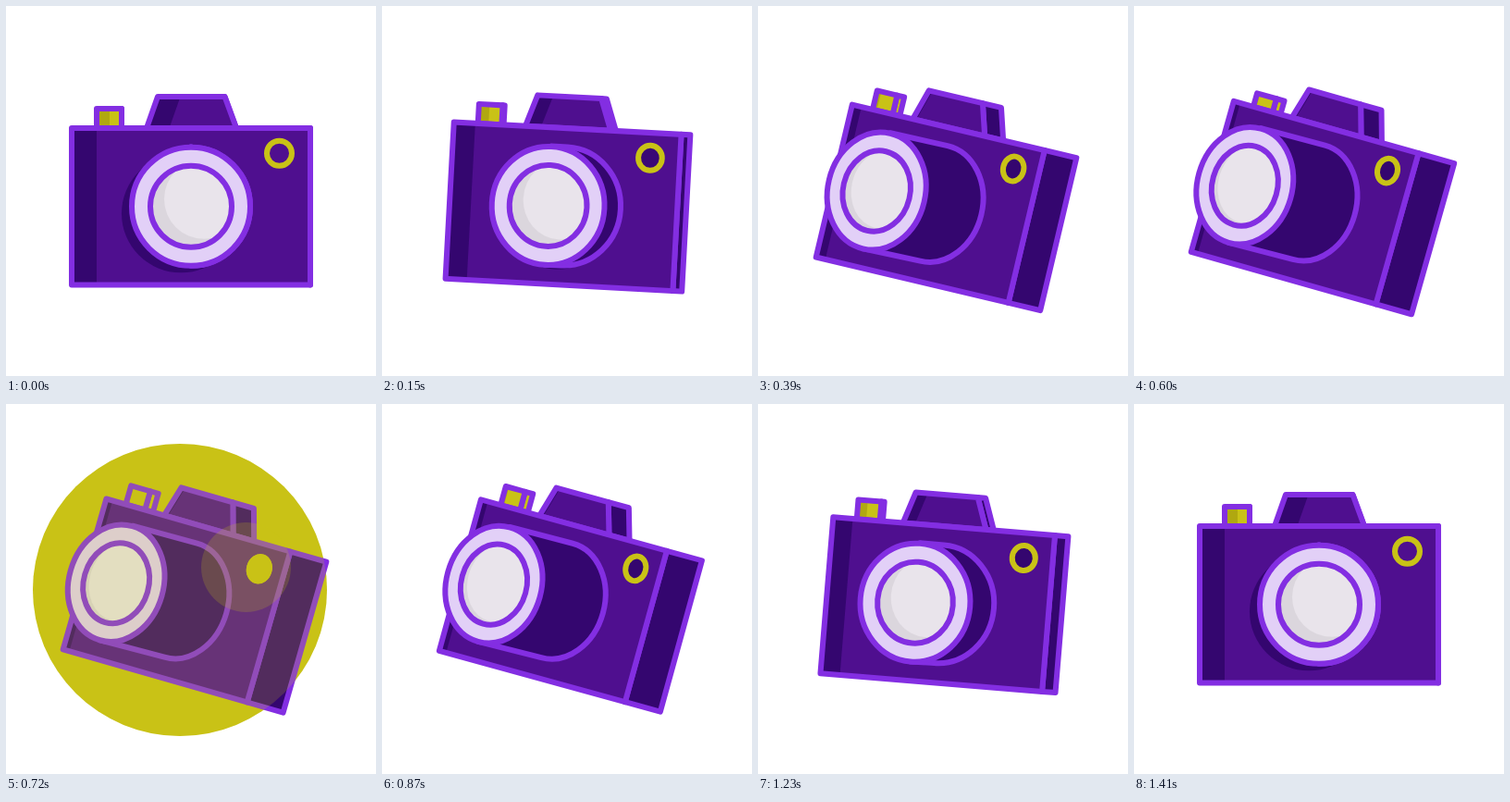
An HTML page with a canvas for the animation above (3.47 s loop, 400 by 400 pixels).

```html
<!DOCTYPE html>
<html lang="en">
<head>
<meta charset="utf-8">
<title>Camera</title>
<style>
  html, body { margin: 0; width: 100%; height: 100%; overflow: hidden; background: #fff; }
  canvas { display: block; width: 100vw; height: 100vh; }
</style>
</head>
<body>
<canvas id="stage"></canvas>
<script>
const LOOP = 3470, STEP = 30, END = 1410;
const LINE = '#832ee2', BODY = '#4f0f8f', DARK = '#34066f';
const RIM = '#e2d0f7', GLASS = '#e9e4eb', SHADE = '#dbd6dd';
const GOLD = '#c9c216', OCHRE = '#b0a810';
const canvas = document.getElementById('stage');
const ctx = canvas.getContext('2d');
const dpr = window.devicePixelRatio || 1;
canvas.width = canvas.height = 400 * dpr;

const clamp = v => Math.max(0, Math.min(1, v));
const mix = (a, b, p) => a + (b - a) * p;
const pulse = (t, from, to) => Math.sin(Math.PI * clamp((t - from) / (to - from)));

// cubic-bezier(.35, 0, .22, 1)
function ease(x) {
  if (x <= 0) return 0;
  if (x >= 1) return 1;
  let lo = 0, hi = 1;
  for (let i = 0; i < 30; i++) {
    const u = (lo + hi) / 2, v = 1 - u;
    if (3 * v * v * u * .35 + 3 * v * u * u * .22 + u * u * u < x) lo = u; else hi = u;
  }
  return lo * lo * (3 - 2 * lo);
}

function paint(fill, stroke) {
  if (fill) { ctx.fillStyle = fill; ctx.fill(); }
  if (stroke) { ctx.strokeStyle = stroke; ctx.stroke(); }
}

function poly(points, fill, stroke) {
  ctx.beginPath();
  points.forEach(([x, y]) => ctx.lineTo(x, y));
  ctx.closePath();
  paint(fill, stroke);
}

function oval(x, y, rx, ry, fill, stroke) {
  ctx.beginPath();
  ctx.ellipse(x, y, rx, ry, 0, 0, 2 * Math.PI);
  paint(fill, stroke);
}

function box(x1, y1, x2, y2, fill, stroke) {
  poly([[x1, y1], [x2, y1], [x2, y2], [x1, y2]], fill, stroke);
}

function camera(turn, press) {
  const s = turn * (1.31 - .31 * turn);   // visible depth
  const k = 1 - .2 * s;                   // foreshortening of the front
  const w = 258 - 10.5 * turn, side = 40.5 * s;
  const left = -w / 2, right = w / 2, edge = right - side;
  const mid = (left + edge) / 2;
  const fx = x => mid + x * k;
  const top = -84.75, low = 84.75;

  // shutter button
  const by = -105.75 + press, bl = fx(-102), br = fx(-75);
  box(br, by, br + 9 * s, top, GOLD, LINE);
  box(bl, by, br, top, GOLD);
  box(bl, by, bl + (14 - 10 * turn) * k, top, OCHRE);
  box(bl, by, br, top, null, LINE);

  // viewfinder hump
  const tl = fx(-36), tr = fx(36.5), hl = fx(-48), hr = fx(49);
  const hs = 23.5 * s, hy = -118.75;
  const band = Math.max(4, 24.5 * (1 - 1.6 * turn));
  poly([[tr, hy], [tr + hs, hy], [hr + hs, top], [hr, top]], DARK, LINE);
  poly([[tl, hy], [tr, hy], [hr, top], [hl, top]], BODY);
  poly([[tl, hy], [tl + band, hy], [hl + band, top], [hl, top]], DARK);
  poly([[tl, hy], [tr, hy], [hr, top], [hl, top]], null, LINE);

  // body
  box(edge, top, right, low, DARK, LINE);
  box(left, top, edge, low, BODY);
  box(left, top, left + 27 - 20 * turn, low, DARK);
  box(left, top, edge, low, null, LINE);

  // flash ring
  ctx.globalAlpha = clamp(4 * turn);
  oval(fx(95.5), -57.5, 13.5 * k, 13.5, DARK);
  ctx.globalAlpha = 1;
  oval(fx(95.5), -57.5, 13.5 * k, 13.5, null, GOLD);

  // lens shadow and barrel
  const rx = 64 * k, ry = 64;
  const base = -16.1 * s, lens = -88.3 * s, drop = clamp(1 - 2.2 * turn);
  oval(base - 11 * drop, 7.5 * drop, rx, ry, DARK);
  ctx.beginPath();
  ctx.moveTo(lens, -ry - .5);
  ctx.lineTo(base, -ry - 1.5 * s);
  ctx.ellipse(base, -1.5 * s, rx, ry, 0, -Math.PI / 2, Math.PI / 2);
  ctx.lineTo(lens, ry);
  ctx.closePath();
  paint(DARK, LINE);

  // lens face
  oval(lens, 0, rx, ry, RIM, LINE);
  oval(lens, 0, 44 * k, 44, SHADE);
  ctx.save();
  ctx.clip();
  oval(lens + 14 - 9 * turn * turn, -8 + 5 * turn, 43 * k, 43, GLASS);
  ctx.restore();
  oval(lens, 0, 44 * k, 44, null, LINE);

  return { s, k, x: fx(95.5), y: -57.5 };
}

function draw(t) {
  ctx.setTransform(dpr, 0, 0, dpr, 0, 0);
  ctx.fillStyle = '#fff';
  ctx.fillRect(0, 0, 400, 400);
  ctx.lineWidth = 6;
  ctx.lineJoin = 'round';

  const half = END / 2;
  const turn = t < half ? ease(t / half) : ease((END - t) / half);
  const flash = pulse(t, 630, 810);
  const glow = () => oval(mix(275, 188, flash), mix(178, 201, flash), 159 * flash, 158 * flash, GOLD);
  if (flash > .01) glow();

  const s = turn * (1.31 - .31 * turn);
  ctx.save();
  ctx.translate(200 + 4 * s, 216.75 + 1.3 * s);
  ctx.rotate(turn * 16 * Math.PI / 180);
  const ring = camera(turn, 6 * pulse(t, 490, 705));
  ctx.restore();

  if (flash > .01) {
    ctx.globalAlpha = .2;
    glow();
    oval(mix(275, 259.5, flash), mix(178, 176.5, flash), 48.5 * flash, 48.5 * flash, GOLD);
    ctx.globalAlpha = 1;
    ctx.save();
    ctx.translate(200 + 4 * s, 216.75 + 1.3 * s);
    ctx.rotate(turn * 16 * Math.PI / 180);
    oval(ring.x, ring.y, 13.5 * ring.k + 3, 16, GOLD);
    ctx.restore();
  }
}

const start = performance.now();
function tick() {
  const t = (performance.now() - start) % LOOP;
  draw(Math.min(END, Math.floor(t / STEP) * STEP));
  requestAnimationFrame(tick);
}
tick();
</script>
</body>
</html>
```
